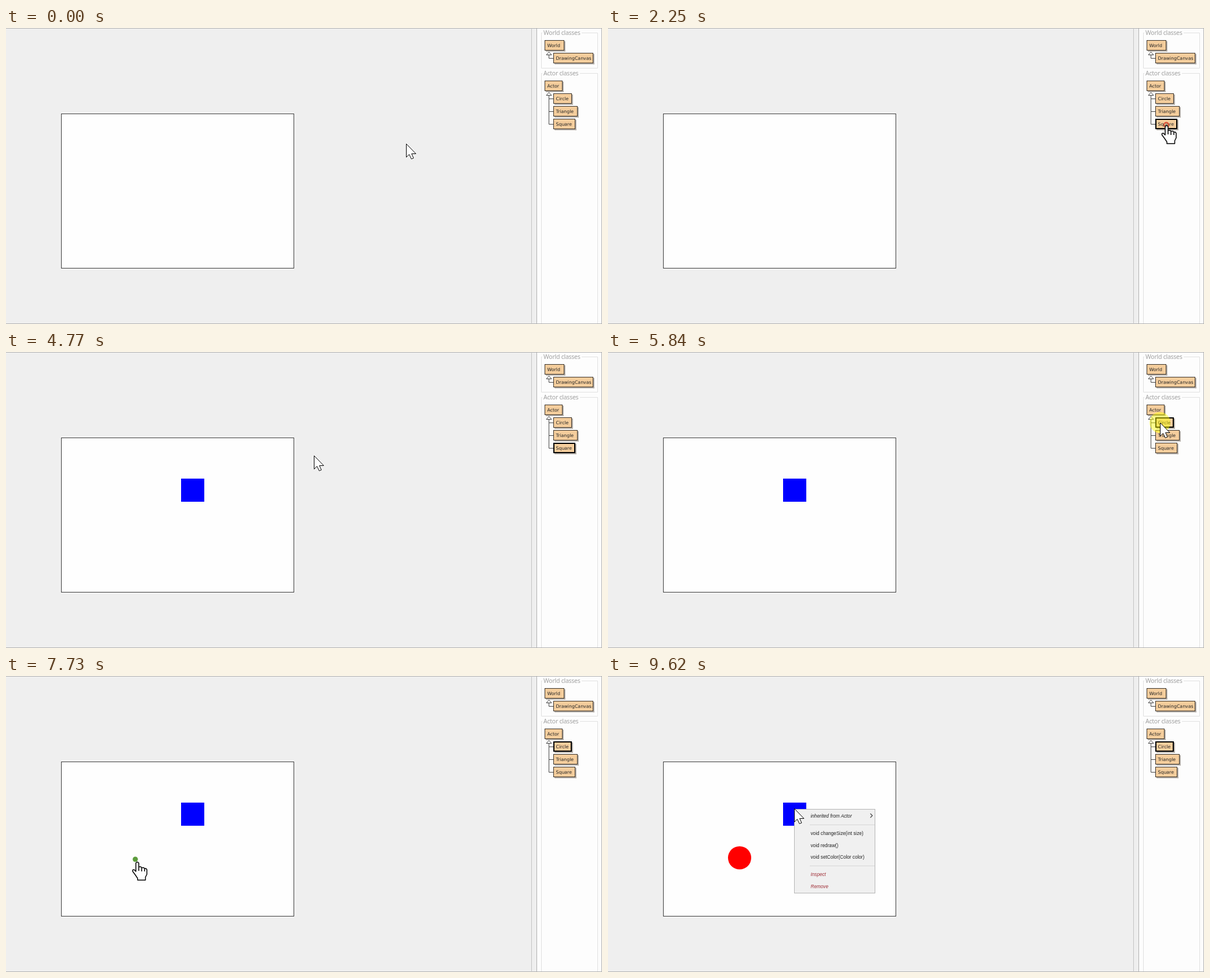
An HTML page that plays this animation: 1028x512 px, repeating every 9.68 s.

```html
<!DOCTYPE html>
<html lang="en">
<head>
<meta charset="utf-8">
<title>Drawing canvas</title>
<style>
  html, body { margin: 0; width: 100%; height: 100%; overflow: hidden; background: #efefef; }
  svg { display: block; width: 1028px; height: 512px; }
  rect { shape-rendering: crispEdges; }
  .title { font: 10.5px "Noto Sans", "Open Sans", sans-serif; letter-spacing: -.25px; fill: #a0a0a0; }
  .name { font: 7.8px "DejaVu Sans", sans-serif; fill: #222; }
  .item { font: 8.2px "Liberation Sans", Arial, sans-serif; fill: #222; }
  .item.it { font-style: italic; }
  .item.red { font-style: italic; fill: #a03038; }
  .group { fill: none; stroke: #e0e0e0; }
  .link { fill: none; stroke: #444; }
  .box { fill: #f4cd9c; stroke: #3a3128; }
  .thick { fill: none; stroke: #000; stroke-width: 2; }
  .cursor { fill: #fff; stroke: #000; stroke-linejoin: round; }
</style>
</head>
<body>
<svg id="stage" viewBox="0 0 1028 512">
  <rect width="1028" height="512" fill="#efefef"/>
  <rect x="916" width="112" height="512" fill="#fdfdfd"/>
  <g fill="#b0b0b0">
    <rect width="1028" height="1"/>
    <rect y="511" width="1028" height="1"/>
    <rect x="906" width="1" height="512" fill="#c4c4c4"/>
    <rect x="915" width="1" height="512"/>
    <rect x="1027" width="1" height="512"/>
  </g>
  <rect x="95.5" y="148.5" width="401" height="267" fill="#fefefe" stroke="#3c3c3c"/>

  <path class="group" d="M925 8.5H923.5V69.5H1020.5V8.5H993M925 78.5H923.5V511M990 78.5H1020.5V511"/>
  <text class="title" x="927" y="12">World classes</text>
  <text class="title" x="927" y="82">Actor classes</text>
  <path class="link" d="M936.5 41.5L932 46.5H941Z M936.5 46.5V52.5H944"/>
  <path class="link" d="M936.5 111.5L932 116.5H941Z M936.5 116.5V166.5H944M936.5 122.5H944M936.5 144.5H944"/>
  <g id="classes"></g>
  <rect id="pickSquare" class="thick" x="945" y="158" width="36" height="16"/>
  <rect id="pickCircle" class="thick" x="945" y="114" width="30" height="16"/>

  <rect id="square" x="302" y="219" width="40" height="40" fill="#00f"/>
  <circle id="circle" cx="227" cy="314.5" r="20" fill="#f00"/>
  <g id="menus"></g>

  <g id="pointer">
    <circle id="ring" r="18" fill="#ff0" opacity=".45"/>
    <circle id="badge" cx="-3" cy="-5" r="4.5" fill="#5c9c3c"/>
    <circle id="barred" cy="-1.5" r="4" fill="none" stroke="#d8452f" stroke-width="2"/>
    <path id="arrow" class="cursor" d="M.5 .5V23.5L5.5 18.7L9.2 26.5L13 25L9.6 17.5H17Z"/>
    <path id="hand" class="cursor" stroke-width="1.5"
      d="M-2 1.5L-.5 0H1.5L3 1.5V8H6.5L8 9.5H11.5L13 11H15.5L17 13V21L14.5 26V31H1V28L-3 22L-7.5 16V13.5L-5 13L-2 16Z M3 8V15M8 9.5V16M13 11V16"/>
  </g>
</svg>
<script>
const LOOP = 9680;
const $ = id => document.getElementById(id);

function add(parent, tag, attrs, text) {
  const el = document.createElementNS("http://www.w3.org/2000/svg", tag);
  for (const key in attrs) el.setAttribute(key, attrs[key]);
  if (text) el.textContent = text;
  parent.append(el);
  return el;
}

function classBox(name, x, y, w) {
  const g = $("classes");
  add(g, "rect", { x: x + 2, y: y + 2, width: w, height: 18, fill: "#b9b4ae" });
  add(g, "rect", { class: "box", x: x + .5, y: y + .5, width: w - 1, height: 17 });
  add(g, "text", { class: "name", x: x + 4.5, y: y + 12 }, name);
}
classBox("World", 929, 21, 34);
classBox("DrawingCanvas", 944, 43, 69);
classBox("Actor", 929, 91, 31);
classBox("Circle", 944, 113, 32);
classBox("Triangle", 944, 135, 42);
classBox("Square", 944, 157, 38);

// Items: "-" is a separator, "!" marks red and "/" italic text.
function menu(x, y, w, h, items) {
  const g = add($("menus"), "g", { transform: `translate(${x} ${y})` });
  add(g, "rect", { x: .5, y: .5, width: w - 1, height: h - 1, fill: "#f0f0f0", stroke: "#b4b4b4" });
  g.hover = add(g, "rect", { x: 1, y: 1, width: w - 2, height: 21, fill: "#d3e4f3" });
  let mid = 12;
  for (const item of items) {
    if (item === "-") {
      add(g, "rect", { x: 27, y: Math.round(mid - 6), width: w - 28, height: 1, fill: "#d6d6d6" });
      mid += 9.4;
      continue;
    }
    const style = { "!": " red", "/": " it" }[item[0]] || "";
    add(g, "text", { class: "item" + style, x: 28.5, y: mid + 3 }, style ? item.slice(1) : item);
    mid += 20.6;
  }
  return g;
}
const classItems = name => [`new ${name}()`, "-", "!Open editor", "!Set image...", "!Inspect",
  "!Duplicate...", "!Delete", "-", "!New subclass..."];
const squareMenu = menu(940, 161, 120, 167, classItems("Square"));
const circleMenu = menu(940, 122, 120, 167, classItems("Circle"));
const objectMenu = menu(321, 230, 140, 146, ["/inherited from Actor", "-", "void changeSize(int size)",
  "void redraw()", "void setColor(Color color)", "-", "!Inspect", "!Remove"]);
add(objectMenu, "path", { d: "M131.5 8L135 11.5L131.5 15", fill: "none", stroke: "#444", "stroke-width": 1.2 });

const linear = u => u;
const smooth = u => u * u * (3 - 2 * u);
const slow = u => Math.sin(u * Math.PI / 2);

// First step, last step, step count, x, y, easing
const moves = [
  [70, 170, 2, 694, 200, linear],
  [400, 950, 8, 959, 156, smooth],
  [1030, 1100, 2, 957, 161, linear],
  [1790, 2020, 4, 963, 169, smooth],
  [2330, 3140, 11, 330, 240, smooth],
  [3210, 3290, 2, 320, 239, linear],
  [4630, 4770, 3, 531, 179, linear],
  [4840, 5380, 8, 954, 129, slow],
  [5560, 5700, 3, 952, 122, linear],
  [6150, 6380, 4, 955, 131, smooth],
  [6700, 7490, 11, 262, 321, smooth],
  [7580, 7660, 2, 232, 327, linear],
  [7730, 7730, 1, 226, 322, linear],
  [7800, 7960, 3, 226, 314, linear],
  [8740, 9210, 7, 321, 229, smooth]
];
const clicks = [[1330, 1410], [2200, 2250], [3610, 3690], [5780, 5850],
  [6550, 6630], [8340, 8420], [9360, 9530]];

function pointerAt(t) {
  let x = 690, y = 200;
  for (const [from, to, n, endX, endY, ease] of moves) {
    if (t < from) break;
    const gap = n > 1 ? (to - from) / (n - 1) : 1;
    const u = ease(Math.min(n, Math.floor((t - from) / gap + .1) + 1) / n);
    x += (endX - x) * u;
    y += (endY - y) * u;
  }
  return [Math.round(x), Math.round(y)];
}

const show = (el, on) => { el.style.display = on ? "" : "none"; };

function draw(t) {
  const within = (a, b) => t >= a && t < b;
  const [x, y] = pointerAt(t);
  const hand = within(2250, 3760) || within(6630, 8510);
  const carrying = within(2250, 3690) || within(6630, 8420);
  $("pointer").setAttribute("transform", `translate(${x} ${y})`);
  show($("hand"), hand);
  show($("arrow"), !hand);
  show($("badge"), carrying && x < 496);
  show($("barred"), carrying && x >= 496);
  show($("ring"), clicks.some(c => within(...c)));
  show($("pickSquare"), within(1330, 5780));
  show($("pickCircle"), t >= 5780);
  show($("square"), t >= 4310);
  show($("circle"), t >= 8510);
  show(squareMenu, within(1490, 2250));
  show(squareMenu.hover, t >= 1865);
  show(circleMenu, within(5920, 6630));
  show(circleMenu.hover, t >= 6225);
  show(objectMenu, t >= 9620);
  show(objectMenu.hover, false);
}

const start = performance.now();
function tick() {
  draw((performance.now() - start) % LOOP);
  requestAnimationFrame(tick);
}
tick();
</script>
</body>
</html>
```
